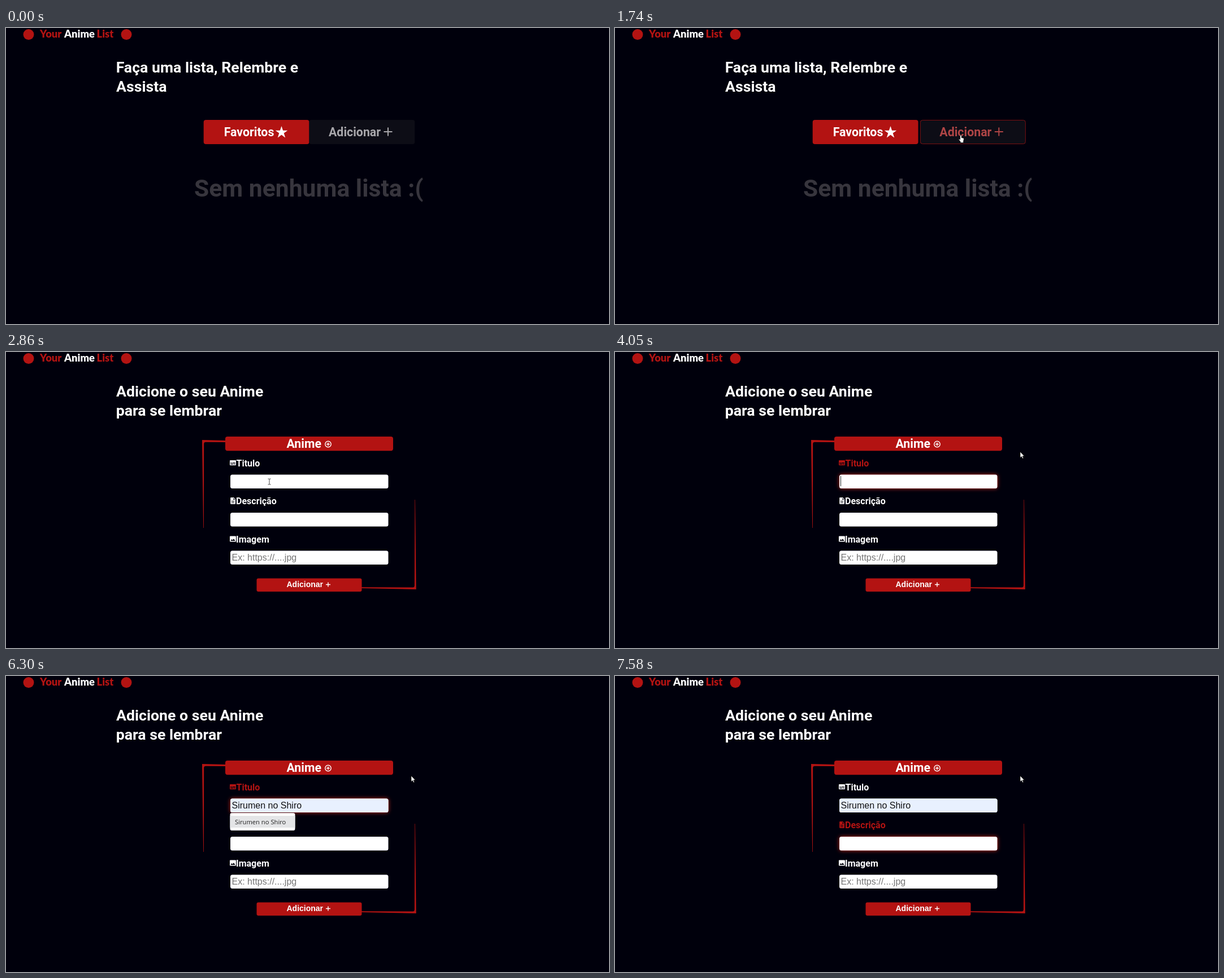
Recreate the animation shown at these times as an HTML page. Size 1067 by 525 pixels, loop 8 s.

```html
<!DOCTYPE html>
<html lang="pt">
<head>
<meta charset="utf-8">
<title>Your Anime List</title>
<style>
html, body { margin: 0; width: 100%; height: 100%; overflow: hidden; background: #00000c; }
svg { display: block; width: 100%; height: 100%; color: #fff; --red: #b31312; }
text { font: 700 21.33px Roboto, sans-serif; fill: currentColor; white-space: pre; }
.brand { font: 900 18.4px Lato, sans-serif; }
.red { fill: var(--red); }
.title { font-size: 26.67px; }
.empty { font-size: 42.67px; fill: #37353d; }
.label { font-size: 16px; }
.input { font: 16px "Liberation Sans", Arial, sans-serif; fill: #111; }
.hint { fill: #757575; }
.submit { font: 700 14px "Liberation Sans", Arial, sans-serif; }
.option { font: 11.2px "Open Sans", sans-serif; fill: #222; }
.line { fill: none; stroke: currentColor; }
.glow { fill: #c01513; filter: blur(3.5px); opacity: 0; }
.caret { stroke: #222; stroke-width: 1; }

/* 1% = 80 ms */
.step, .flow { animation: 8s infinite; }
.step { animation-timing-function: step-end; opacity: 0; }
.flow { animation-timing-function: ease; }

.list { animation-name: list; }
.form { animation-name: form; }
@keyframes list { 0% { opacity: 1 } 25%, to { opacity: 0 } }
@keyframes form { 0% { opacity: 0 } 25%, to { opacity: 1 } }

.add { color: #a8a7ab; animation-name: add; }
.edge { stroke: var(--red); fill: none; stroke-opacity: 0; animation-name: edge; }
@keyframes add {
  0%, 20.8% { transform: none; color: #a8a7ab }
  23.3%, to { transform: translateX(5px); color: #b31312 }
}
@keyframes edge { 0%, 20.8% { stroke-opacity: 0 } 23.3%, to { stroke-opacity: 1 } }

.name-label { animation-name: name-label; }
.name-glow { animation-name: name-glow; }
.about-label { animation-name: about-label; }
.about-glow { animation-name: about-glow; }
@keyframes name-label { 0%, 35.75%, 90.75%, to { color: #fff } 38.25%, 88.25% { color: #b31312 } }
@keyframes name-glow { 0%, 35.75%, 90.75%, to { opacity: 0 } 38.25%, 88.25% { opacity: 1 } }
@keyframes about-label { 0%, 88.25% { color: #fff } 90.75%, to { color: #b31312 } }
@keyframes about-glow { 0%, 88.25% { opacity: 0 } 90.75%, to { opacity: 1 } }

.blink { animation-name: blink; }
.typed1 { animation-name: typed1; }
.typed2 { animation-name: typed2; }
.filled { animation-name: filled; }
.editing { animation-name: editing; }
.blink2 { animation-name: blink2; }
.popup { animation-name: popup; }
.picked { animation-name: picked; }
@keyframes blink {
  0%, 44.125%, 57.75%, 69.25%, to { opacity: 0 }
  37.375%, 50.625%, 64.5% { opacity: 1 }
}
@keyframes typed1 { 0%, 72.375%, to { opacity: 0 } 69.25% { opacity: 1 } }
@keyframes typed2 { 0%, 78.75%, to { opacity: 0 } 72.375% { opacity: 1 } }
@keyframes filled { 0% { opacity: 0 } 78.75%, to { opacity: 1 } }
@keyframes editing { 0%, 88.25%, to { opacity: 0 } 83.125% { opacity: 1 } }
@keyframes blink2 { 0%, 94.75%, to { opacity: 0 } 88.25% { opacity: 1 } }
@keyframes popup { 0%, 59.875%, 83.125%, to { opacity: 0 } 51.625%, 69.25% { opacity: 1 } }
@keyframes picked { 0%, 83.125%, to { opacity: 0 } 78.75% { opacity: 1 } }

.pointer { animation: move 8s linear infinite; }
.arrow { animation-name: arrow; }
.hand { animation-name: hand; }
.beam { animation-name: beam; }
@keyframes move {
  0%, .625% { transform: translate(977px, 486px) }
  3.5% { transform: translate(875px, 432px) }
  7% { transform: translate(722px, 315px) }
  8.5% { transform: translate(704px, 258px); animation-timing-function: ease-out }
  10.5% { transform: translate(680px, 221px) }
  12.125% { transform: translate(670px, 218px) }
  14.5% { transform: translate(655px, 300px) }
  15.5% { transform: translate(625px, 311px) }
  17% { transform: translate(560px, 290px) }
  18% { transform: translate(539px, 260px) }
  19% { transform: translate(560px, 225px); animation-timing-function: ease-out }
  20.625% { transform: translate(611px, 190px) }
  21%, 25.5% { transform: translate(612px, 190px); animation-timing-function: ease-in-out }
  31% { transform: translate(466px, 231px) }
  32.25%, 37.25% { transform: translate(466px, 230px); animation-timing-function: ease-in-out }
  40.375%, to { transform: translate(717px, 177px) }
}
@keyframes arrow { 0%, 21%, 29% { opacity: 0 } .625%, 25%, 38.2%, to { opacity: 1 } }
@keyframes hand { 0%, 25%, to { opacity: 0 } 21% { opacity: 1 } }
@keyframes beam { 0%, 38.2%, to { opacity: 0 } 29% { opacity: 1 } }
</style>
</head>
<body>
<svg viewBox="0 0 1067 525">
  <circle class="red" cx="40" cy="11.5" r="9.5"/>
  <circle class="red" cx="213" cy="11.5" r="9.5"/>
  <text class="brand red" x="60" y="17">Your</text>
  <text class="brand" x="103" y="17">Anime</text>
  <text class="brand red" x="160.5" y="17">List</text>

  <g class="step list">
    <text class="title" x="194.7" y="79">Faça uma lista, Relembre e</text>
    <text class="title" x="195" y="113">Assista</text>
    <rect class="red" x="349.7" y="163" width="186.8" height="43" rx="4"/>
    <text x="385.7" y="191.5">Favoritos</text>
    <path fill="#fff" d="M487.5 174l2.6 7.8h8.2l-6.6 4.8 2.5 7.9-6.7-4.9-6.7 4.9 2.5-7.9-6.6-4.8h8.2z"/>
    <g class="flow add">
      <rect x="536.5" y="163" width="186.8" height="43" rx="4" fill="#0d0d16"/>
      <rect class="flow edge" x="537" y="163.5" width="186" height="42" rx="4"/>
      <text x="571" y="191.5">Adicionar</text>
      <path class="line" stroke-width="2" d="M668.5 184h15M676 176.5v15"/>
    </g>
    <text class="empty" x="333" y="299.2">Sem nenhuma lista :(</text>
  </g>

  <g class="step form">
    <text class="title" x="195" y="79">Adicione o seu Anime</text>
    <text class="title" x="194.7" y="112.7">para se lembrar</text>
    <path class="red" d="M347 156L389 157V160L353 159.8Q350.3 160 350.2 163L349.9 312H349.2Z"/>
    <path class="red" d="M725.8 421L629 419V417.2L720 417.6Q722.8 417.5 722.9 414L723.4 262H724Z"/>
    <rect class="red" x="388" y="150" width="297" height="25.3" rx="4"/>
    <text x="496.5" y="170.3">Anime</text>
    <g class="line" stroke-width="1.4">
      <circle cx="570" cy="163.5" r="5.2"/>
      <path d="M567 163.5h6M570 160.5v6"/>
    </g>

    <g class="flow name-label">
      <path fill="currentColor" fill-rule="evenodd" d="M397 192h9q1 0 1 1v7q0 1-1 1h-9q-1 0-1-1v-7q0-1 1-1zM397.3 196v1.2h2.2V196zM400.5 196v1.2h5.2V196zM397.3 198.3v1.2h5.2v-1.2zM403.5 198.3v1.2h2.2v-1.2z"/>
      <text class="label" x="407.5" y="202.8">Titulo</text>
    </g>
    <g class="flow about-label">
      <path fill="currentColor" fill-rule="evenodd" d="M398 258h5l3 3.2v7.8q0 .8-.8.8H398q-.8 0-.8-.8v-10.2q0-.8.8-.8zM402.3 259v3h3zM399 264v1.1h5V264zM399 266.4v1.1h5v-1.1z"/>
      <text class="label" x="407" y="270.3">Descrição</text>
    </g>
    <path fill="#fff" fill-rule="evenodd" d="M397 326.5h9q1 0 1 1v8q0 1-1 1h-9q-1 0-1-1v-8q0-1 1-1zM397.3 335h8.4l-2.8-3.8-2.1 2.6-1.4-1.7z"/>
    <text class="label" x="407" y="337.8">Imagem</text>

    <rect class="flow glow name-glow" x="397" y="217.5" width="279.5" height="24.5" rx="4"/>
    <rect class="flow glow about-glow" x="397" y="285" width="279.5" height="24.5" rx="4"/>
    <g fill="#fff">
      <rect x="397" y="217.5" width="279.5" height="24.5" rx="3.5"/>
      <rect x="397" y="285" width="279.5" height="24.5" rx="3.5"/>
      <rect x="397" y="352.5" width="279.5" height="24.5" rx="3.5"/>
    </g>
    <path class="caret step blink" d="M399.5 220v18"/>
    <g class="step typed1">
      <text class="input" x="399.5" y="235">S</text>
      <path class="caret" d="M410.5 220v18"/>
    </g>
    <g class="step typed2">
      <text class="input" x="399.5" y="235">Si</text>
      <path class="caret" d="M414.5 220v18"/>
    </g>
    <g class="step filled">
      <rect x="397" y="217.5" width="279.5" height="24.5" rx="3.5" fill="#e8f0fe"/>
      <text class="input" x="399.5" y="235">Sirumen no Shiro</text>
    </g>
    <g class="step editing">
      <path stroke="#e0446a" d="M400 237.5h58M486 237.5h36"/>
      <path class="caret" d="M523.5 220v18"/>
    </g>
    <path class="caret step blink2" d="M399.5 288v18"/>
    <text class="input hint" x="399.5" y="370">Ex: https://....jpg</text>

    <rect class="red" x="443.5" y="401.5" width="186" height="23.5" rx="3"/>
    <text class="submit" x="496.5" y="417.3">Adicionar</text>
    <path class="line" stroke-width="1.4" d="M566 412.5h8M570 408.5v8"/>

    <g class="step popup">
      <rect x="396.5" y="243" width="115" height="31" rx="3" fill="#fff"/>
      <rect class="step picked" x="396.5" y="248" width="115" height="21" fill="#e4e5e7"/>
      <text class="option" x="405" y="262.5">Sirumen no Shiro</text>
    </g>
  </g>

  <g class="pointer">
    <path class="step arrow" fill="#fff" stroke="#000" stroke-width=".6" d="M0 0V10.5L2.4 8.3 4 12 5.7 11.3 4.1 7.7H7.3Z"/>
    <path class="step hand" fill="#fff" stroke="#000" stroke-width=".7" d="M-1.4 8V1Q-1.2 0 0 0T1.2 1V4.5L4.5 5.2Q5.5 5.6 5.4 7L4.6 11V13.5H-.8V11.8L-3.6 8.2Q-4 7 -3 6.8Z"/>
    <path class="step beam" fill="none" stroke="#444" d="M-2.5-5H-.8L0-4.3.8-5H2.5M0-4.5V4.5M-2.5 5H-.8L0 4.3.8 5H2.5"/>
  </g>
</svg>
</body>
</html>
```
